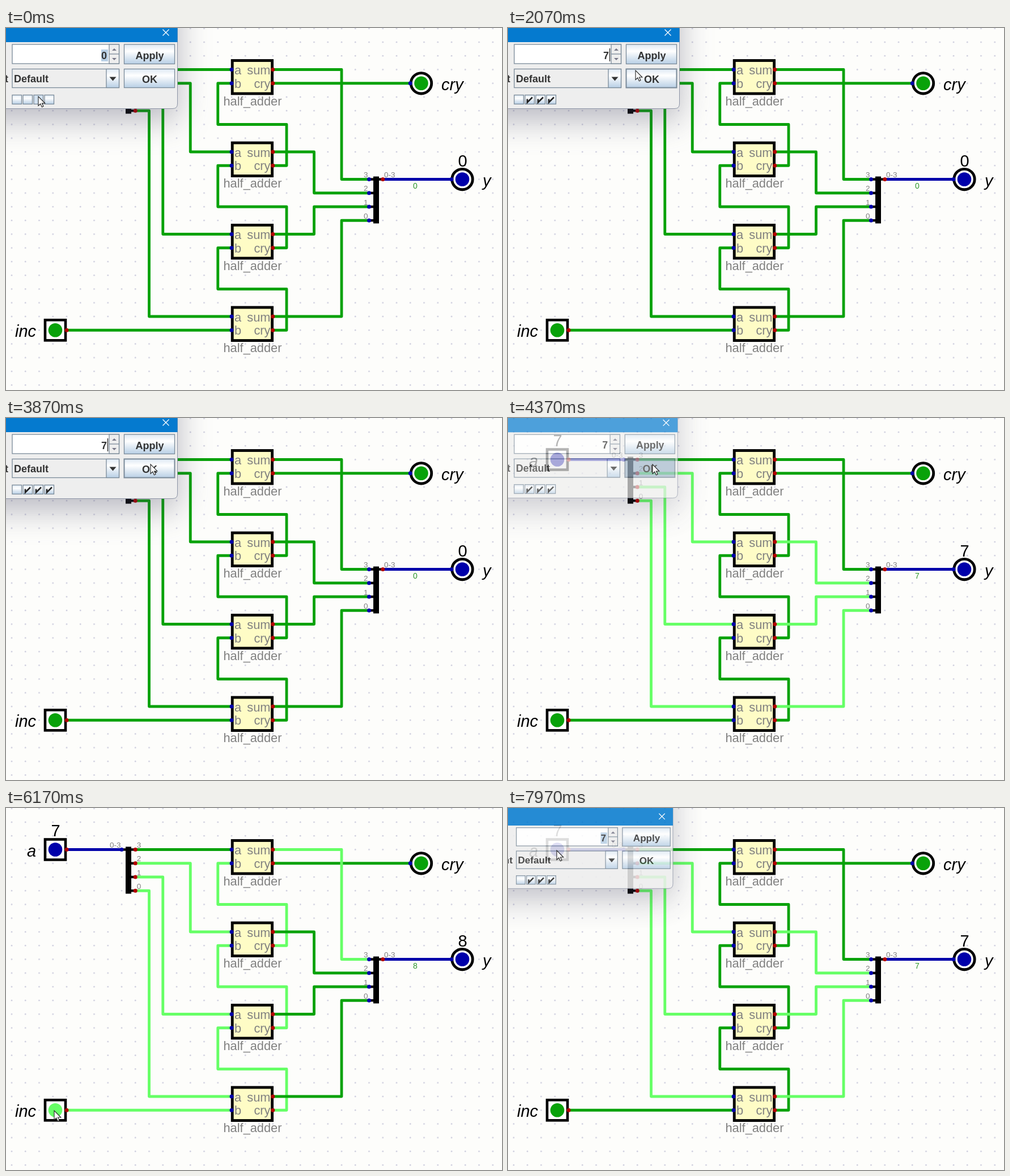
Write an HTML page that moves like this. It is 875 by 640 pixels and loops after 8 s.

```html
<!DOCTYPE html>
<html lang="en">
<head>
<meta charset="utf-8">
<title>Incrementer circuit</title>
<style>
  html, body { margin: 0; width: 100%; height: 100%; overflow: hidden; background: #fdfdfb; }
  svg { display: block; width: 100%; height: 100%; }
  text { font-family: "Liberation Sans", Arial, sans-serif; font-size: 21.8px; }
  .wire { fill: none; stroke-width: 4.85; stroke-linejoin: round; stroke-linecap: round; }
  .pin { fill: #808080; }
  .small { font-size: 13.5px; fill: #808080; }
  .bus { font-size: 14px; fill: #2f962f; text-anchor: middle; }
  .name { font-size: 29px; font-style: italic; }
  .value { font-size: 29px; text-anchor: middle; }
  .end { text-anchor: end; }
  .mid { text-anchor: middle; }
  .ui { font-size: 18px; font-weight: bold; fill: #333; }
  .edge { stroke: #7a8a99; stroke-width: 1.3; }
</style>
</head>
<body>
<svg id="stage" viewBox="0 0 875 640"></svg>
<script>
const PERIOD = 8000, STEP = 24.25;
const LOW = '#08a20a', HIGH = '#66ff66', BUS = '#0000aa';
const gx = i => 10 + STEP * i, gy = j => 0.75 + STEP * j;
const rows = [21, 15, 9, 3];            // adder rows, lowest bit first

const text = (x, y, s, cls, id = '') => `<text x="${x}" y="${y}" class="${cls}" id="${id}">${s}</text>`;
const rect = (x, y, w, h, attrs) => `<rect x="${x}" y="${y}" width="${w}" height="${h}" ${attrs}/>`;
const disc = (x, y, r, attrs) => `<circle cx="${x}" cy="${y}" r="${r}" ${attrs}/>`;
const line = (d, attrs) => `<path d="${d}" ${attrs}/>`;
const dot = (i, j, isOutput) => disc(gx(i), gy(j), 3.5, `fill="${isOutput ? '#b20000' : BUS}"`);

// Points are grid coordinates: x0, y0, x1, y1, ...
function wire(id, ...p) {
  const points = [];
  for (let k = 0; k < p.length; k += 2) points.push(gx(p[k]) + ',' + gy(p[k + 1]));
  return `<polyline class="wire" id="${id}" stroke="${BUS}" points="${points.join(' ')}"/>`;
}

function adder(row) {
  const y = gy(row);
  return rect(399.2, y - 16, 70.4, 58.5, 'fill="#fefcc6" stroke="#000" stroke-width="4.85"') +
    text(403, y + 8.5, 'a', 'pin') + text(403, y + 32, 'b', 'pin') +
    text(466.5, y + 8.5, 'sum', 'pin end') + text(466.5, y + 32, 'cry', 'pin end') +
    text(435, y + 63, 'half_adder', 'pin mid') +
    dot(16, row, 0) + dot(16, row + 1, 0) + dot(19, row, 1) + dot(19, row + 1, 1);
}

function splitter(barX, row, busColumn, bitColumn) {
  const fansOut = bitColumn > busColumn;
  const stub = (i, j) => line(`M${barX} ${gy(j)}H${gx(i)}`, 'stroke="#000" stroke-width="4.4"');
  let s = rect(barX - 5, gy(row) - 5, 10, 83, '') + stub(busColumn, row) + dot(busColumn, row, !fansOut);
  for (let k = 0; k < 4; k++) {
    const x = gx(bitColumn) + (fansOut ? 2.5 : -9.5);
    s += stub(bitColumn, row + k) + dot(bitColumn, row + k, fansOut) +
      text(x, gy(row + k) - 3.5, 3 - k, 'small');
  }
  return s + text(fansOut ? 183 : 667, gy(row) - 3.5, '0-3', 'small');
}

const inputPin = (row, id) => rect(69, gy(row) - 18, 36, 36, 'fill="#fff" stroke="#000" stroke-width="4.6"') +
  disc(87, gy(row), 12.3, `id="${id}" fill="${BUS}"`) + dot(4, row, 1);
const outputPin = (x, row, column, id) => disc(x, gy(row), 18.2, 'fill="#fff" stroke="#000" stroke-width="4.85"') +
  disc(x, gy(row), 12.3, `id="${id}" fill="${BUS}"`) + dot(column, row, 0);

function circuit() {
  let s = rect(0, 0, 875, 640, 'fill="url(#dots)"') +
    wire('busA', 4, 3, 8, 3) + wire('busY', 27, 11, 32, 11) + wire('inc', 4, 22, 16, 22) +
    wire('a3', 9, 3, 16, 3) + wire('c3', 19, 4, 29, 4);
  [10, 11, 13].forEach((column, k) => {
    const r = rows[k];
    s += wire('a' + k, 9, 6 - k, column, 6 - k, column, r, 16, r) +
      wire('c' + k, 19, r + 1, 20, r + 1, 20, r - 2, 15, r - 2, 15, r - 5, 16, r - 5);
  });
  [24, 22, 22, 24].forEach((column, k) => {
    s += wire('s' + k, 19, rows[k], column, rows[k], column, 14 - k, 26, 14 - k);
  });
  return s + rows.map(adder).join('') +
    splitter(216, 3, 8, 9) + splitter(653, 11, 27, 26) +
    inputPin(3, 'lampA') + inputPin(22, 'lampInc') +
    outputPin(732.5, 4, 29, 'lampCry') + outputPin(805, 11, 32, 'lampY') +
    text(37, 86, 'a', 'name') + text(16, 546, 'inc', 'name') +
    text(768, 110, 'cry', 'name') + text(841, 280, 'y', 'name') +
    text(87.5, 50, '', 'value', 'valueA') + text(805.5, 245, '', 'value', 'valueY') +
    text(722, 284, '', 'bus', 'busValue');
}

function dialog() {
  const face = 'class="edge" fill="url(#metal)"';
  let s = line('M-400 -200H302.5V134Q302.5 142.500 294 142.500H-400Z',
      'fill="#eee" stroke="#8d94a6" style="filter:drop-shadow(0 20px 28px rgba(60,60,90,.36))"') +
    rect(-400, -200, 702.5, 225, 'fill="#057acf"') +
    line('M276.500 2.500l11 11m0-11l-11 11', 'stroke="#fff" stroke-width="1.3"') +
    rect(11, 29, 188.5, 34, 'class="edge" fill="#fff"') +
    rect(182, 29, 17.5, 34, 'class="edge" fill="#eee"') + line('M182 46h17.500', 'class="edge"') +
    line('M187 40l4-4 4 4zM187 53l4 4 4-4z', 'fill="#778"') +
    rect(168, 38, 12, 21, 'id="selection" fill="#b8cfe5"') +
    text(178, 54.5, '', 'ui end', 'field') + line('M179.500 36V59', 'id="caret" stroke="#222" stroke-width="1.3"') +
    rect(11, 72.5, 188.5, 33, 'class="edge" fill="#eee"') + rect(177, 72.5, 22.5, 33, face) +
    line('M182.500 86.500h12l-6 7z', 'fill="#333"') +
    text(14, 95.5, 'Default', 'ui') + text(4, 96, 'nt', 'ui end') +
    rect(208.5, 29, 89, 34.5, face) + text(253.5, 54.5, 'Apply', 'ui mid') +
    rect(208.5, 72.5, 89, 33, 'id="ok" ' + face) + text(253.5, 97, 'OK', 'ui mid');
  for (let k = 3; k >= 0; k--) {
    const x = 68 - 19 * k;
    s += rect(x, 118.5, 16.5, 16, `id="box${k}" ` + face) +
      line(`M${x + 4} 125.500v6l9-9`, `id="check${k}" fill="none" stroke="#222" stroke-width="2.6"`);
  }
  return `<g id="dialog">${s}</g>`;
}

document.getElementById('stage').innerHTML = `<defs>
  <pattern id="dots" x="${gx(0) - 5}" y="${gy(0) - 5}" width="${STEP}" height="${STEP}" patternUnits="userSpaceOnUse">
    ${disc(5, 5, 1.3, 'fill="#cbcbdc"')}</pattern>
  <linearGradient id="metal" x2="0" y2="1"><stop stop-color="#dde8f3"/>
    <stop offset=".35" stop-color="#fff"/><stop offset="1" stop-color="#b8cfe5"/></linearGradient></defs>` +
  circuit() + dialog() +
  line('M0 0V16.500L3.800 13L6.400 18.800L9 17.600L6.500 12H11.800Z', 'id="cursor" fill="#fff" stroke="#222" stroke-width="1.1"');

const el = {};
document.querySelectorAll('[id]').forEach(node => el[node.id] = node);
const set = (id, name, value) => el[id].setAttribute(name, value);
const show = (id, visible) => set(id, 'visibility', visible ? 'inherit' : 'hidden');
const label = (id, value) => { el[id].textContent = value; };
const clamp = u => Math.min(1, Math.max(0, u));

// Time, x, y
const cursorPath = [
  [0, 57, 121], [500, 57, 122], [750, 74, 122], [1150, 74, 122], [1400, 38, 123], [1650, 38, 123],
  [2070, 225, 75], [2450, 252, 71], [3100, 262, 70], [3900, 255, 82], [4450, 255, 82],
  [5250, 85, 535], [6700, 85, 535], [7450, 86, 75], [8000, 86, 75]
];

function cursorAt(t) {
  const n = cursorPath.findIndex(p => p[0] > t);
  const [t0, x0, y0] = cursorPath[n - 1], [t1, x1, y1] = cursorPath[n];
  const u = (t - t0) / (t1 - t0), e = u * u * (3 - 2 * u);
  return [x0 + (x1 - x0) * e, y0 + (y1 - y0) * e];
}

function drawCircuit(a, inc) {
  const color = bit => bit ? HIGH : LOW;
  let carry = inc;
  set('inc', 'stroke', color(inc));
  set('lampInc', 'fill', color(inc));
  for (let k = 0; k < 4; k++) {
    const bit = a >> k & 1;
    set('a' + k, 'stroke', color(bit));
    set('s' + k, 'stroke', color(bit ^ carry));
    carry &= bit;
    set('c' + k, 'stroke', color(carry));
  }
  set('lampCry', 'fill', color(carry));
  const y = a + inc & 15;
  label('valueA', a);
  label('valueY', y);
  label('busValue', y);
}

function drawDialog(t, x, y) {
  const closing = clamp((t - 4330) / 140), opening = clamp((t - 7900) / 82);
  const reopened = t >= 7900;
  const alpha = reopened ? opening : 1 - closing;
  const scale = reopened ? 0.9 + 0.055 * opening : 1 - 0.038 * closing;
  const [cx, cy] = reopened ? [82, 140] : [10, 48];
  show('dialog', alpha > 0);
  set('dialog', 'opacity', alpha);
  set('dialog', 'transform', `translate(${cx} ${cy}) scale(${scale}) translate(${-cx} ${-cy})`);

  const entered = t < 300 ? 0 : t < 850 ? 2 : t < 1500 ? 3 : 7;
  const selected = t < 300 || reopened;
  label('field', entered);
  show('selection', selected);
  show('caret', !selected && t < 4250);
  for (let k = 0; k < 4; k++) {
    show('check' + k, entered >> k & 1);
    const left = 68 - 19 * k;
    const hover = !reopened && y > 118 && y < 135 && x >= left && x < left + 17;
    set('box' + k, 'fill', hover ? '#d3e2f0' : 'url(#metal)');
  }
  set('ok', 'fill', t > 4180 && !reopened ? '#a3b8cc' : 'url(#metal)');
  el.ok.style.strokeWidth = t > 1900 && !reopened ? 2 : 1.3;
}

function frame(now) {
  const t = now % PERIOD;
  const [x, y] = cursorAt(t);
  drawCircuit(t < 4270 ? 0 : 7, t >= 5500 && t < 6500 ? 1 : 0);
  drawDialog(t, x, y);
  set('cursor', 'transform', `translate(${x} ${y})`);
  requestAnimationFrame(frame);
}
frame(0);
</script>
</body>
</html>
```
